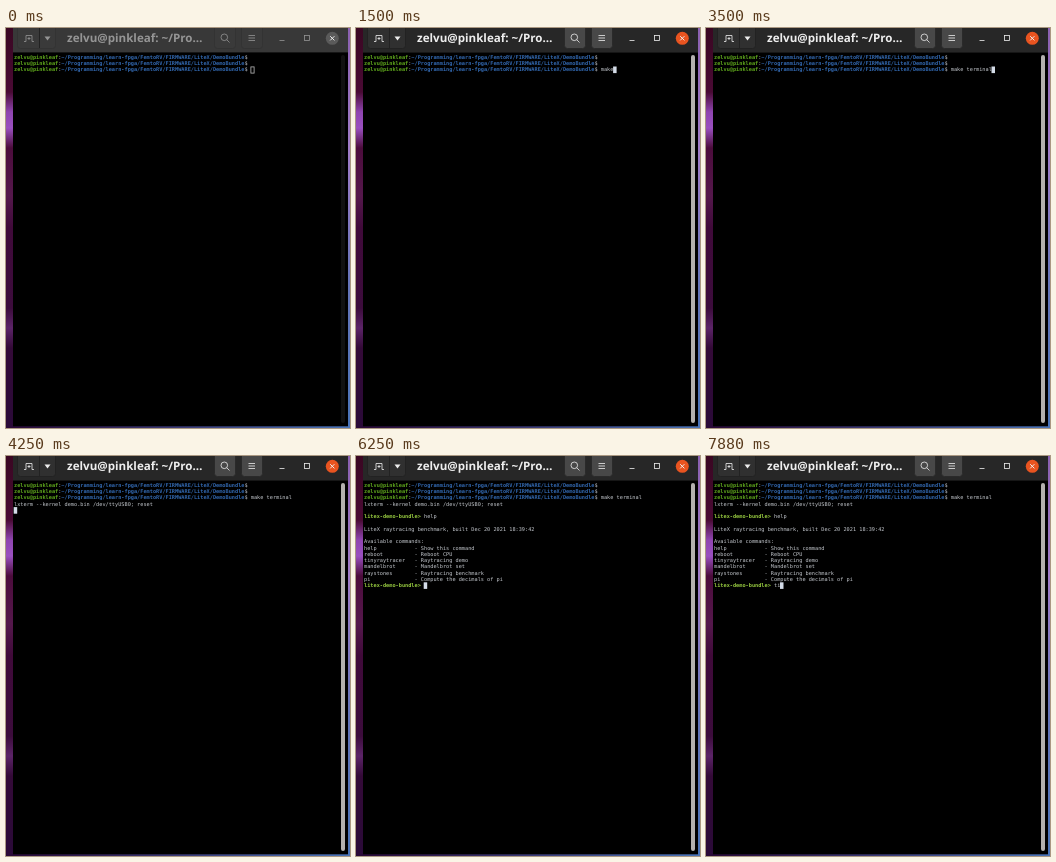
Write an HTML page that moves like this. It is 344 by 400 pixels and loops after 8 s.

```html
<!DOCTYPE html>
<html lang="en">
<head>
<meta charset="utf-8">
<title>Terminal session</title>
<style>
  html, body { margin: 0; width: 100%; height: 100%; overflow: hidden; background: #2a0c28; }
  #stage { position: relative; width: 344px; height: 400px; overflow: hidden; }
  svg { position: absolute; left: 0; top: 0; }
  .title { font: bold 11.6px "Noto Sans", "Open Sans", sans-serif; text-rendering: geometricPrecision; }
  .icon { fill: none; stroke: currentColor; stroke-width: .8; }
  #window { color: #eee; }
  #bar { fill: #272727; }
  .button { fill: #303030; stroke: #222; }
  .button.raised { fill: #484848; stroke: #2a2a2a; }
  #scrollbar { fill: #b4b1ae; }
  #close { fill: #e95420; }
  #window.inactive { color: #959595; }
  .inactive #bar { fill: #383838; }
  .inactive .button { fill: #3a3a3a; stroke: #333; }
  .inactive #scrollbar { fill: #111; }
  .inactive #close { fill: #5a5a5a; }
  /* Laid out at ten times the size so that the tiny character grid stays exact. */
  #screen {
    position: absolute; left: 7.8px; top: 25.9px; margin: 0;
    transform: scale(.1); transform-origin: 0 0;
    font: 52.44px/62.7px "DejaVu Sans Mono", monospace;
    text-rendering: geometricPrecision; color: #c6cad0;
  }
  .user { color: #5fa81c; font-weight: bold; }
  .path { color: #3268b0; font-weight: bold; }
  .demo { color: #98cc40; font-weight: bold; }
  #cursor {
    position: absolute; box-sizing: border-box; margin-left: -3px;
    width: 35px; height: 66px; background: #d4dce8;
  }
  #cursor.hollow { width: 40px; height: 70px; background: none; border: 8px solid #bbb; }
</style>
</head>
<body>
<div id="stage">
  <svg id="window" width="344" height="400" viewBox="0 0 344 400">
    <defs>
      <linearGradient id="left" x2="0" y2="1">
        <stop offset="0" stop-color="#3a0722"/>
        <stop offset=".16" stop-color="#4a0a34"/>
        <stop offset=".21" stop-color="#8f45b0"/>
        <stop offset=".25" stop-color="#9a50c0"/>
        <stop offset=".3" stop-color="#4c0c3c"/>
        <stop offset=".42" stop-color="#55184c"/>
        <stop offset=".5" stop-color="#400a3a"/>
        <stop offset=".7" stop-color="#3c0c3c"/>
        <stop offset=".75" stop-color="#5c2468"/>
        <stop offset=".8" stop-color="#340a38"/>
        <stop offset="1" stop-color="#2a0a38"/>
      </linearGradient>
      <linearGradient id="right" x2="0" y2="1">
        <stop offset="0" stop-color="#8a60b0"/>
        <stop offset=".3" stop-color="#a07cc8"/>
        <stop offset=".65" stop-color="#6474b8"/>
        <stop offset="1" stop-color="#4a74b8"/>
      </linearGradient>
      <linearGradient id="bottom">
        <stop offset="0" stop-color="#2a0a38"/>
        <stop offset=".5" stop-color="#3c3c78"/>
        <stop offset="1" stop-color="#4a74b8"/>
      </linearGradient>
    </defs>
    <rect width="8" height="400" fill="url(#left)"/>
    <rect x="341" width="3" height="400" fill="url(#right)"/>
    <rect x="7" y="398" width="337" height="2" fill="url(#bottom)"/>
    <rect x="7" width="335" height="398.3" fill="#000"/>
    <rect id="bar" x="7" width="335" height="24"/>
    <path d="M7 24.5H342" stroke="#161616"/>
    <rect id="scrollbar" x="335" y="27" width="4" height="368" rx="2"/>

    <rect class="button" x="11.5" y="-3.5" width="38" height="24" rx="3"/>
    <path d="M33.5 -3V20" stroke="#222"/>
    <path class="icon" d="M18 13.5H20V7.5H26V13.5H28M23 9V12M21.5 10.5H24.5"/>
    <path d="M38.5 8.5H44.5L41.5 12.5Z" fill="currentColor"/>
    <text class="title" x="61" y="14.3" fill="currentColor">zelvu@pinkleaf: ~/Pro…</text>
    <rect class="button raised" x="208.5" y="-3.5" width="21" height="24" rx="3"/>
    <circle class="icon" cx="218.3" cy="9.3" r="3.3"/>
    <path class="icon" d="M220.7 11.7L223.5 14.5"/>
    <rect class="button raised" x="235.5" y="-3.5" width="21" height="24" rx="3"/>
    <path class="icon" d="M242.5 7.5H249M242.5 10H249M242.5 12.5H249"/>
    <path class="icon" d="M273.5 12.5H278.5"/>
    <rect class="icon" x="298.5" y="7.5" width="5" height="5"/>
    <circle id="close" cx="326.3" cy="10.3" r="6.5"/>
    <path d="M324.2 8.2L328.4 12.4M328.4 8.2L324.2 12.4" stroke="#eee"/>
  </svg>

  <pre id="screen"><span id="text"></span><span id="cursor"></span></pre>

  <svg id="pointer" width="344" height="400" viewBox="0 0 344 400" fill="none">
    <g id="beam">
      <path d="M-3 -6H-1.2L0 -5L1.2 -6H3M0 -5V5M-3 6H-1.2L0 5L1.2 6H3" stroke="#444" stroke-width="3"/>
      <path d="M-3 -6H-1.2L0 -5L1.2 -6H3M0 -5V5M-3 6H-1.2L0 5L1.2 6H3" stroke="#ccc" stroke-width="1.2"/>
    </g>
  </svg>
</div>

<script>
  const LOOP = 8000, TICK = 125;
  const byId = id => document.getElementById(id);
  const win = byId('window'), text = byId('text'), cursor = byId('cursor');
  const pointer = byId('pointer'), beam = byId('beam');

  const span = (kind, content) => `<span class="${kind}">${content}</span>`;
  const shellPrompt = span('user', 'zelvu@pinkleaf') + ':' +
    span('path', '~/Programming/learn-fpga/FemtoRV/FIRMWARE/LiteX/DemoBundle') + '$ ';
  const demoPrompt = span('demo', 'litex-demo-bundle&gt;') + ' ';

  const commands = [
    ['help', 'Show this command'],
    ['reboot', 'Reboot CPU'],
    ['tinyraytracer', 'Raytracing demo'],
    ['mandelbrot', 'Mandelbrot set'],
    ['raystones', 'Raytracing benchmark'],
    ['pi', 'Compute the decimals of pi'],
  ].map(([name, what]) => name.padEnd(16) + '- ' + what);

  // Typing with corrections: number of letters present on each tick from the first key.
  const MAKE_START = 10;
  const makeLengths = [1, 2, 4, 5, 6, 7, 8, 9, 10, 11, 10, 9, 10, 11, 12, 13];

  const typeMake = tick => tick < MAKE_START ? '' :
    'make terminal'.slice(0, makeLengths[Math.min(tick - MAKE_START, makeLengths.length - 1)]);
  const typeKeys = (word, keyTicks, tick) =>
    word.slice(0, keyTicks.filter(key => key <= tick).length);

  function screenLines(tick) {
    const lines = [shellPrompt, shellPrompt, shellPrompt + typeMake(tick)];
    if (tick >= 30) lines.push('');
    if (tick >= 31) lines.splice(3, 1, 'lxterm --kernel demo.bin /dev/ttyUSB0; reset', '');
    if (tick >= 37) lines.push(demoPrompt + typeKeys('help', [42, 43, 45, 47], tick));
    if (tick >= 50) lines.push(
      '', 'LiteX raytracing benchmark, built Dec 20 2021 18:39:42',
      '', 'Available commands:', ...commands,
      demoPrompt + typeKeys('ti', [61, 63], tick));
    return lines;
  }

  function draw(tick) {
    const focused = tick >= 4;
    win.classList.toggle('inactive', !focused);

    text.innerHTML = screenLines(tick).join('\n');
    const rows = text.textContent.split('\n');
    cursor.style.left = rows.at(-1).length + 'ch';
    cursor.style.top = (rows.length - 1) * 62.7 + 'px';
    cursor.className = focused ? '' : 'hollow';
    cursor.hidden = tick >= 55 && tick < 60;

    pointer.style.display = tick >= 1 && tick < MAKE_START ? '' : 'none';
    beam.setAttribute('transform', tick < 2 ? 'translate(322 270)' : 'translate(295.5 181.5)');
  }

  let shown = -1;
  function frame() {
    const tick = Math.floor(performance.now() % LOOP / TICK);
    if (tick !== shown) draw(shown = tick);
    requestAnimationFrame(frame);
  }
  frame();
</script>
</body>
</html>
```
